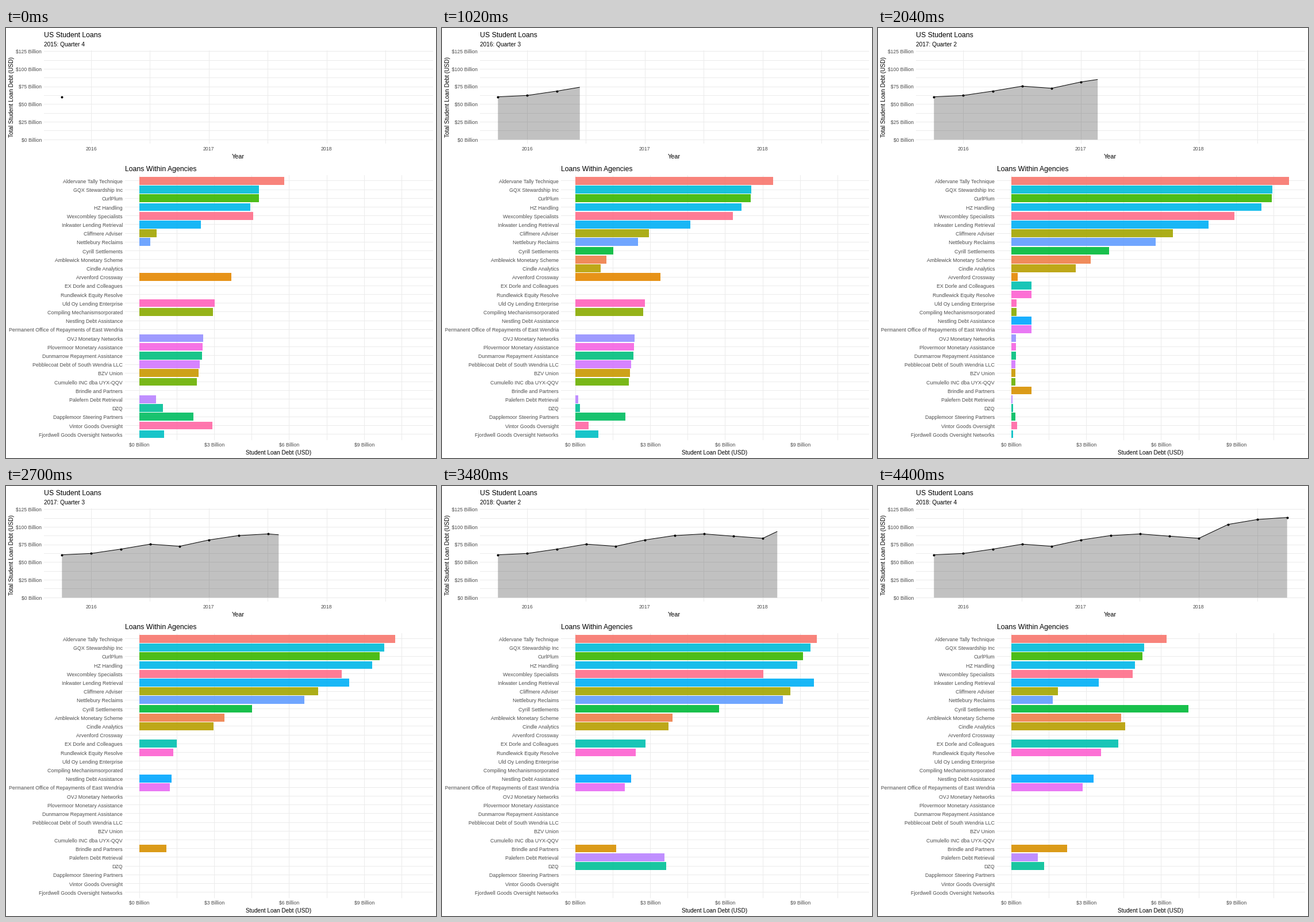
A matplotlib script that plays this animation: 748 by 748 pixels, repeating every 4.42 s.

```python
import matplotlib.pyplot as plt
import numpy as np
from matplotlib.animation import FuncAnimation
from matplotlib.patches import Polygon

SIZE, DPI = 748, 100
PX = 72 / DPI                      # points per pixel
FRAMES, INTERVAL = 221, 20
STATES, STEP, HOLD = 13, 17, 9     # quarters, frames per quarter, frames at rest
GRID, TICK = "#EBEBEB", "#4D4D4D"
Q = np.arange(STATES)

# Total debt per quarter in billions
TOTALS = np.array([60.7, 62.7, 68.8, 75.8, 72.8, 81.8, 88,
                   90.3, 87.1, 84.1, 103.8, 110.8, 113.6])
BASE_Y, UNIT_Y = 194.3, 1.2288
TOTAL_X = 97.3 + 51.2 * Q
TOTAL_Y = BASE_Y - UNIT_Y * TOTALS
BAR_X, BAR_H, BAR_UNIT = 232, 13.68, 43


def climb(start, mid, end):
    """Steep growth up to the seventh quarter, then a drift to the end."""
    first = np.interp(Q, [0, 1, 3, 4, 5, 6], [0, 0.19, 0.385, 0.72, 0.88, 1])
    drift = np.clip((Q - 6) / 6, 0, 1) ** (1.4 if end > mid else 0.8)
    return start + (mid - start) * first + (end - mid) * drift


def late(end):
    return np.where(Q < 6, 0, climb(0, 35.5, end))


def fade(start):
    return start * np.interp(Q, [0, 3, 4, 5, 6], [1, 0.92, 0.2, 0.1, 0.07], right=0)


def drop(start, back=0):
    """Early collapse, with an optional comeback."""
    return (start * np.interp(Q, [0, 1, 6], [1, 0.25, 0.08], right=0)
            + back * np.interp(Q, [9, 10, 12], [0.43, 0.94, 1], left=0))


AGENCIES = {
    "Aldervane Tally Technique": climb(252, 486, 393),
    "GQX Stewardship Inc": climb(208, 457, 389),
    "CurlPlum": climb(208, 455, 372),
    "HZ Handling": climb(193, 437, 366),
    "Wexcombley Specialists": climb(198, 390, 302),
    "Inkwater Lending Retrieval": climb(107, 345, 467),
    "Cliffmere Adviser": climb(30, 283, 442),
    "Nettlebury Reclaims": climb(19, 252, 443),
    "Cyrill Settlements": climb(0, 171, 310),
    "Amblewick Monetary Scheme": climb(0, 139, 192),
    "Cindle Analytics": climb(0, 113, 199),
    "Arvenford Crossway": fade(160),
    "EX Dorle and Colleagues": late(187),
    "Rundlewick Equity Resolve": late(157),
    "Uld Oy Lending Enterprise": fade(131),
    "Compiling Mechanismsorporated": fade(128),
    "Nestling Debt Assistance": late(144),
    "Permanent Office of Repayments of East Wendria": late(125),
    "OVJ Monetary Networks": fade(111),
    "Plovermoor Monetary Assistance": fade(110),
    "Dunmarrow Repayment Assistance": fade(109),
    "Pebblecoat Debt of South Wendria LLC": fade(105),
    "BZV Union": fade(103),
    "Cumulello INC dba UYX-QQV": fade(100),
    "Brindle and Partners": late(98),
    "Palefern Debt Retrieval": drop(29, 165),
    "DZQ": drop(41, 168),
    "Dapplemoor Steering Partners": fade(94),
    "Vintor Goods Oversight": drop(127),
    "Fjordwell Goods Oversight Networks": fade(43),
}
ROWS = len(AGENCIES)
ROW_Y = 265.9 + 15.197 * np.arange(ROWS)

# Bars of one quarter add up to that quarter's total; nan means not listed.
lengths = np.array(list(AGENCIES.values()), dtype=float)
lengths *= TOTALS * BAR_UNIT / lengths.sum(axis=0)
lengths[lengths == 0] = np.nan


def hcl(hue, chroma=100, lum=65):
    """Polar LUV colour to clipped sRGB."""
    h = np.radians(hue)
    u = chroma * np.cos(h) / (13 * lum) + 0.19784
    v = chroma * np.sin(h) / (13 * lum) + 0.46834
    y = ((lum + 16) / 116) ** 3
    x = 9 * y * u / (4 * v)
    z = y * (12 - 3 * u - 20 * v) / (4 * v)
    rgb = np.array([3.2405 * x - 1.5371 * y - 0.4985 * z,
                    -0.9693 * x + 1.8760 * y + 0.0416 * z,
                    0.0556 * x - 0.2040 * y + 1.0572 * z])
    rgb = np.clip(rgb, 0, 1)
    return np.where(rgb > 0.00304, 1.055 * rgb ** (1 / 2.4) - 0.055, 12.92 * rgb)


def label(x, y, text, size, color="black", ha="left", **kw):
    kw.setdefault("va", "baseline")
    return ax.text(x, y, text, fontsize=size * PX, color=color, ha=ha, **kw)


def grid(xs, ys, left, right, top, bottom):
    """One-pixel lines centred on whole pixels."""
    style = dict(colors=GRID, linewidths=PX, zorder=1, snap=False)
    ax.vlines(np.floor(xs) + 0.5, top, bottom, **style)
    ax.hlines(np.floor(ys) + 0.5, left, right, **style)


plt.rcParams["font.family"] = "Liberation Sans"
fig = plt.figure(figsize=(SIZE / DPI, SIZE / DPI), dpi=DPI, facecolor="white")
ax = fig.add_axes([0, 0, 1, 1])
ax.axis("off")

# Upper panel
grid(148.4 + 102.4 * np.arange(6), BASE_Y - 15.36 * np.arange(11), 66, 743, 39, 201)
label(66, 15.6, "US Student Loans", 12.2)
subtitle = label(66, 31.6, "", 10.1)
for n in range(6):
    label(62, BASE_Y - 30.72 * n + 3.2, f"\\${25 * n} Billion", 8.6, TICK, "right")
for n in range(3):
    label(148 + 204.9 * n, 213.4, str(2016 + n), 8.8, TICK, "center")
label(404, 227, "Year", 10.8, ha="center")
label(10.5, 120.5, "Total Student Loan Debt (USD)", 10.1, ha="center",
      va="center", rotation=90)

# Lower panel
grid(BAR_X + 65.2 * np.arange(8), ROW_Y, 207, 743, 256, 717)
label(207.5, 249, "Loans Within Agencies", 12.2)
for name, y in zip(AGENCIES, ROW_Y):
    label(203, y + 4.2, name, 8.9, TICK, "right")
for n in range(4):
    label(BAR_X + 130.4 * n, 728, f"\\${3 * n} Billion", 8.6, TICK, "center")
label(474.5, 741.5, "Student Loan Debt (USD)", 9.95, ha="center")

# Hues run around the wheel in alphabetical order.
ranks = sorted(AGENCIES, key=str.lower)
colors = [hcl(15 + 360 * ranks.index(name) / ROWS) for name in AGENCIES]
bars = ax.barh(ROW_Y, np.zeros(ROWS), height=BAR_H, left=BAR_X, linewidth=0,
               color=colors, alpha=0.9, zorder=2)
area = ax.add_patch(Polygon([(0, 0)] * 3, closed=True, facecolor="#333333",
                            alpha=0.3, linewidth=0, zorder=2))
line, = ax.plot([], [], color="black", lw=PX, solid_capstyle="butt", zorder=3)
dots, = ax.plot([], [], "o", color="black", ms=4 * PX, mew=0, zorder=4)
ax.set_xlim(0, SIZE)
ax.set_ylim(SIZE, 0)


def bar_lengths(i):
    """Rest, then move linearly; arrivals and exits switch at the end."""
    k, phase = divmod(i, STEP)
    a, b = lengths[:, k], lengths[:, (k + 1) % STATES]
    p = max(0, phase - HOLD) / (STEP - HOLD)
    return np.nan_to_num(np.where(np.isnan(b), a, a + (b - a) * p))


def update(i):
    t = i * (STATES - 1) / (FRAMES - 1)
    seen = int(t) + 1
    head = np.interp(t, Q, TOTAL_X)
    xs = np.append(TOTAL_X[:seen], head)
    ys = np.append(TOTAL_Y[:seen], np.interp(t, Q, TOTAL_Y))
    line.set_data(xs, ys)
    dots.set_data(TOTAL_X[:seen], TOTAL_Y[:seen])
    area.set_xy(np.column_stack([np.r_[xs, head, xs[0]],
                                 np.r_[ys, BASE_Y, BASE_Y]]))
    year, quarter = divmod(i // STEP + 3, 4)
    subtitle.set_text(f"{2015 + year}: Quarter {quarter + 1}")
    for bar, w in zip(bars, bar_lengths(i)):
        bar.set_width(w)
    return [line, dots, area, subtitle, *bars]


anim = FuncAnimation(fig, update, frames=FRAMES, interval=INTERVAL,
                     repeat=True, repeat_delay=0, blit=False)
plt.show()
```
